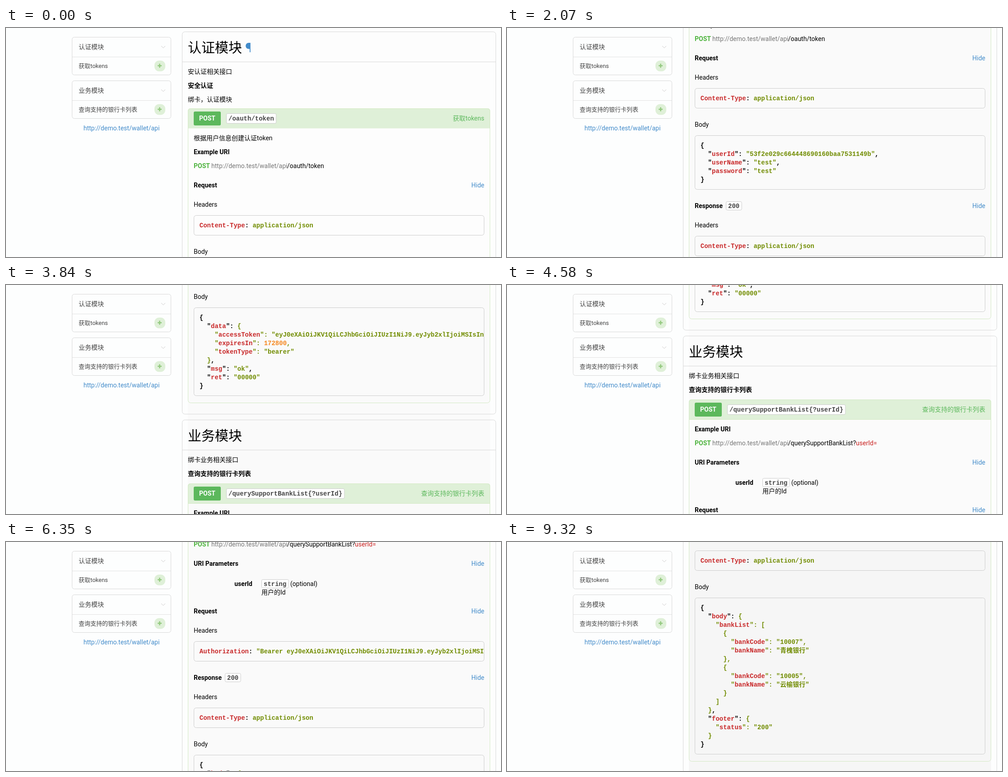
Animation, 1097 px wide and 510 px high, one loop 9780 ms. Source, as an HTML page:

```html
<!DOCTYPE html>
<html lang="zh-CN">
<head>
<meta charset="utf-8">
<title>API</title>
<style>
  html, body { margin: 0; width: 100%; height: 100%; overflow: hidden; background: #fdfefe; }
  svg { display: block; }
  text { font: 14px Roboto, "Noto Sans CJK SC", sans-serif; white-space: pre; }
  .bold { font-weight: 700; }
  .end { text-anchor: end; }
  .mid { text-anchor: middle; }
  .title { font-size: 30px; font-weight: 300; }
  .menu { fill: #444; }
  .small { font-size: 13px; }
  .link { fill: #428bca; }
  .name { fill: #5cb85c; }
  .method { fill: #4db33d; font-weight: 700; }
  .host { fill: #777; font-weight: 400; }
  .path { fill: #000; font-weight: 400; }
  .query { fill: #c9201f; font-weight: 400; }
  .code { font: 700 14px "Liberation Mono", "Noto Sans CJK SC", monospace; }
  .chip { fill: #444; }
  .key { fill: #c82829; }
  .value { fill: #718c00; }
  .number { fill: #f5871f; }
  .plain { fill: #000; }
  .box { fill: none; stroke: #d8d8d8; }
  .pre { fill: none; stroke: #ccc; }
  .call { fill: none; stroke: #d3e9c3; }
</style>
</head>
<body>
<svg id="stage" width="1097" height="510"></svg>
<script>
const LOOP = 9780;
const API = 'http://demo.test/wallet/api';
const TOKEN = 'eyJ0eXAiOiJKV1QiLCJhbGciOiJIUzI1NiJ9.eyJyb2xlIjoiMSIsIn';
const JSON_TYPE = ['Content-Type: application/json'];

// Text is placed by the middle of its line.
const text = (x, middle, content, cls = '') =>
  `<text x="${x}" y="${middle + 5}" class="${cls}">${content}</text>`;
const span = (cls, content) => content ? `<tspan class="${cls}">${content}</tspan>` : '';
const rect = (x, y, w, h, r, attrs) =>
  `<rect x="${x}" y="${y}" width="${w}" height="${h}" rx="${r}" ${attrs}/>`;
const line = (x1, x2, y, color) => `<path d="M${x1} ${y}H${x2}" stroke="${color}"/>`;

const chip = (x, middle, content, height = 19) =>
  rect(x + .5, middle - height / 2, content.length * 8.4 + 9.5, height, 3, 'fill="#fefefe" stroke="#ccc"') +
  text(x + 5, middle - .5, content, 'code chip');

function highlight(source) {
  const [, indent, quote = '', key, colon, value, comma] =
    source.match(/^( *)(?:("?)([\w-]+)("?: ))?(.*?)(,?)$/);
  const outer = indent.length < 4 ? 'plain' : 'value';
  const inner = /^\d/.test(value) ? 'number' : key || indent ? 'value' : 'plain';
  return indent + span(outer, quote) + span('key', key) + span(outer, colon) +
    span(inner, value) + span(outer, comma);
}

const pre = (y, lines) =>
  rect(416.5, y, 643, lines.length * 19 + 25, 5, 'class="pre"') +
  '<g clip-path="url(#pane)">' +
  lines.map((source, i) => text(428.8, y + 21.5 + i * 19, highlight(source), 'code')).join('') +
  '</g>';

const section = (top, bottom, title) =>
  rect(390.5, top, 695, bottom - top, 6, 'class="box"') +
  line(391, 1085, top + 67, '#d8d8d8') +
  text(403, top + 40.5, title, 'title');

const endpoint = (top, bottom, path, name) =>
  `<path d="M403 ${top + 44}V${top + 5}q0-5.5 5.5-5.5h659q5.5 0 5.5 5.5v${39}z" fill="#dff0d8"/>` +
  rect(403.5, top, 669, bottom - top, 6, 'class="call"') +
  rect(416, top + 6.5, 60, 31, 3, 'fill="#5cb85c"') +
  text(446, top + 21.5, 'POST', 'bold mid" fill="#fff') +
  chip(488, top + 22, path, 22) +
  text(1060, top + 21.5, name, 'name end');

const example = (middle, path, query = '') =>
  text(416, middle - 31, 'Example URI', 'bold') +
  text(416, middle, 'POST ' + span('host', API), 'method') +
  text(623, middle, span('path', path) + span('query', query));

const heading = (middle, label, status) =>
  text(416, middle, label, 'bold') + text(1060, middle, 'Hide', 'link end') +
  (status ? chip(485, middle, status) : '');

const menu = (top, title, item) =>
  rect(146.5, top, 219, 84, 5, 'class="box"') + line(147, 365, top + 44, '#e2e2e2') +
  text(161, top + 21.5, title, 'menu') + text(161, top + 63, item, 'menu small') +
  `<path d="M344 ${top + 19.5}l4.5 4.5 4.5-4.5" fill="none" stroke="#ccc"/>` +
  rect(329, top + 52, 24, 24, 10, 'fill="#dff0d8"') +
  `<path d="M336 ${top + 63.5}h9m-4.5-4.5v9" stroke="#93c97f" stroke-width="2.6"/>`;

const bank = (code, name, comma) =>
  ['      {', `        "bankCode": "${code}",`, `        "bankName": "${name}"`, '      }' + comma];

const authSection =
  section(8.5, 1088.5, '认证模块 <tspan x="530" class="link">¶</tspan>') +
  text(403, 97, '安认证相关接口') + text(403, 128, '安全认证', 'bold') +
  text(403, 159, '绑卡，认证模块') +
  endpoint(179.5, 1063.5, '/oauth/token', '获取tokens') +
  text(416, 245, '根据用户信息创建认证token') +
  example(307, '/oauth/token') +
  heading(350, 'Request') +
  text(416, 393, 'Headers') + pre(417.5, JSON_TYPE) +
  text(416, 498, 'Body') + pre(522.5, [
    '{',
    '  "userId": "53f2e029c664448690160baa7531149b",',
    '  "userName": "test",',
    '  "password": "test"',
    '}']) +
  heading(679, 'Response', '200') +
  text(416, 722, 'Headers') + pre(746.5, JSON_TYPE) +
  text(416, 827, 'Body') + pre(851.5, [
    '{',
    '  "data": {',
    `    "accessToken": "${TOKEN}`,
    '    "expiresIn": 172800,',
    '    "tokenType": "bearer"',
    '  },',
    '  "msg": "ok",',
    '  "ret": "00000"',
    '}']);

const bankSection =
  section(1101.5, 2198.5, '业务模块') +
  text(403, 1190, '绑卡业务相关接口') + text(403, 1221, '查询支持的银行卡列表', 'bold') +
  endpoint(1243.5, 2173.5, '/querySupportBankList{?userId}', '查询支持的银行卡列表') +
  line(404, 1072, 1287.5, '#d3e9c3') +
  example(1340, '/querySupportBankList?', 'userId=') +
  heading(1383, 'URI Parameters') +
  text(546, 1428, 'userId', 'bold end') + chip(566, 1428, 'string') +
  text(630, 1428, '(optional)') + text(566, 1447, '用户的Id') +
  heading(1489, 'Request') +
  text(416, 1532, 'Headers') + pre(1556.5, [`Authorization: "Bearer ${TOKEN}`]) +
  heading(1637, 'Response', '200') +
  text(416, 1680, 'Headers') + pre(1704.5, JSON_TYPE) +
  text(416, 1785, 'Body') + pre(1809.5, [
    '{',
    '  "body": {',
    '    "bankList": [',
    ...bank('10007', '青槐银行', ','),
    ...bank('10005', '云榆银行', ''),
    '    ]',
    '  },',
    '  "footer": {',
    '    "status": "200"',
    '  }',
    '}']);

document.getElementById('stage').innerHTML =
  '<clipPath id="pane"><rect x="417" width="642" height="2300"/></clipPath>' +
  rect(403, 0, 670, 510, 0, 'id="shade"') +
  `<g id="page">${authSection}${bankSection}</g>` +
  menu(20.5, '认证模块', '获取tokens') + menu(117.5, '业务模块', '查询支持的银行卡列表') +
  text(256, 223, API, 'link mid');

const page = document.getElementById('page');
const shade = document.getElementById('shade');

// Bursts of scrolling: first step, last step, offset after each step.
const BURSTS = [
  [150, 150, [3]],
  [600, 890, [20, 55, 90]],
  [1340, 3990, [105, 140, 178, 215, 250, 283, 320, 362, 408, 456, 506, 556, 606,
    656, 701, 741, 776, 801, 821]],
  [4290, 4870, [870, 930, 988, 1020, 1035]],
  [5170, 5470, [1045, 1065, 1090]],
  [5760, 7970, [1137, 1185, 1235, 1285, 1335, 1385, 1435, 1485, 1530, 1566, 1595,
    1620, 1642, 1660, 1675, 1685]],
];
// Grey level of the content column by scroll offset.
const GREYS = [[0, 253], [283, 250], [606, 249], [988, 251], [1137, 253], [1595, 247], [1685, 246]];

function scrollAt(time) {
  let offset = 0;
  for (const [start, end, stops] of BURSTS) {
    const step = (end - start) / (stops.length - 1 || 1);
    stops.forEach((stop, i) => { if (time >= start + i * step - 8) offset = stop; });
  }
  return offset;
}

function greyAt(offset) {
  const next = Math.max(1, GREYS.findIndex(([at]) => at >= offset));
  const [[y0, g0], [y1, g1]] = [GREYS[next - 1], GREYS[next]];
  return Math.round(g0 + (g1 - g0) * (offset - y0) / (y1 - y0));
}

function draw() {
  const offset = scrollAt(performance.now() % LOOP);
  const grey = greyAt(offset);
  page.setAttribute('transform', `translate(0 ${-offset})`);
  shade.setAttribute('fill', `rgb(${grey},${grey},${grey})`);
  requestAnimationFrame(draw);
}
draw();
</script>
</body>
</html>
```
